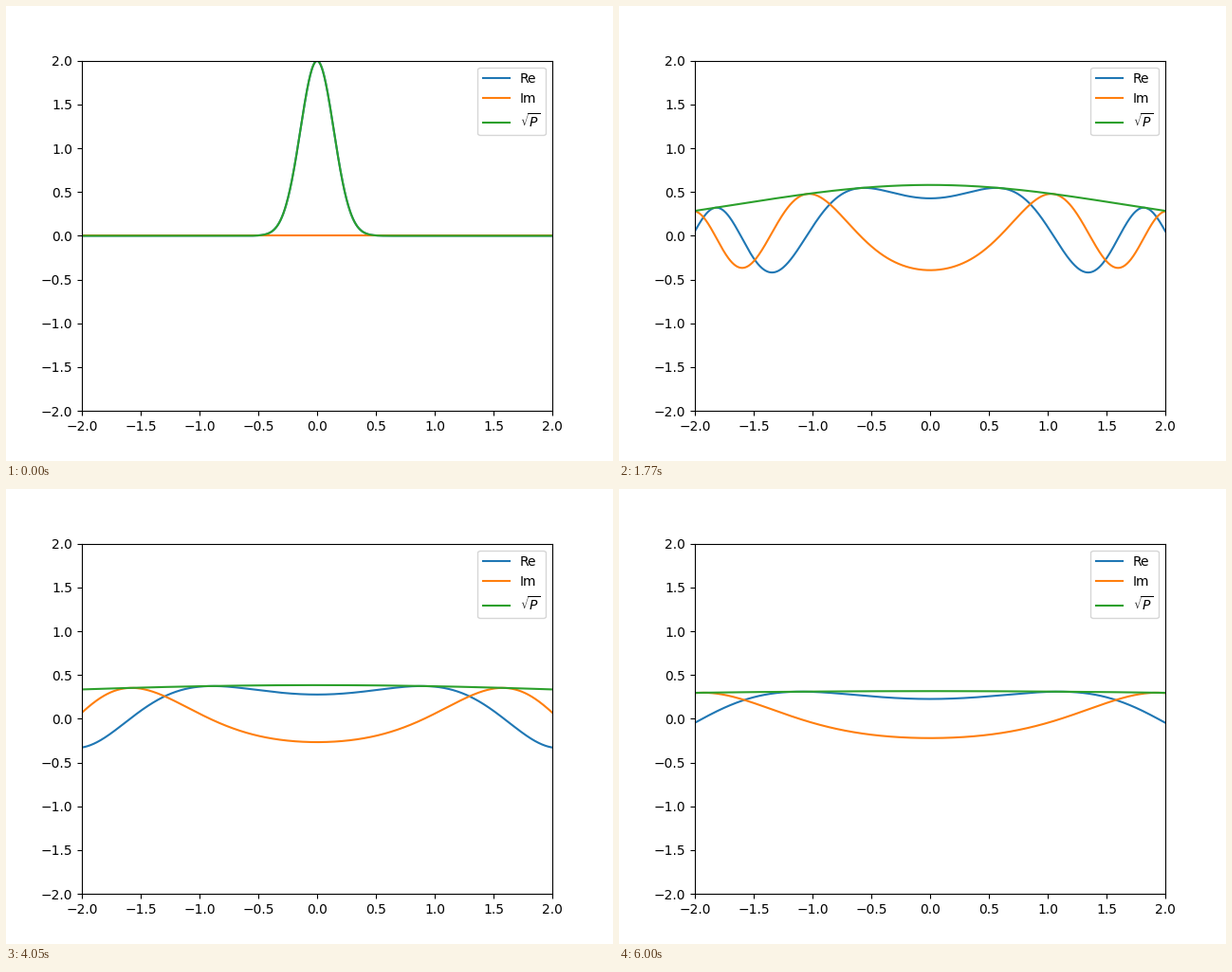
Animation, 640 px wide and 480 px high, one loop 6030 ms. Source, as a matplotlib script:

```python
import numpy as np
import matplotlib.pyplot as plt
from matplotlib.animation import FuncAnimation

FRAMES = 201
INTERVAL = 30      # ms
DT = 0.004         # simulated time per frame
SIGMA = 0.1        # initial packet width

x = np.linspace(-2, 2, 1000)


def psi(t):
    """Free Gaussian wave packet at rest, with hbar = m = 1."""
    spread = 1 + 1j * t / (2 * SIGMA**2)
    norm = (2 * np.pi * SIGMA**2) ** -0.25
    return norm / np.sqrt(spread) * np.exp(-x**2 / (4 * SIGMA**2 * spread))


fig, ax = plt.subplots(figsize=(6.4, 4.8), dpi=100)
ax.set_xlim(-2, 2)
ax.set_ylim(-2, 2)
lines = [ax.plot(x, np.zeros_like(x), label=label)[0]
         for label in ("Re", "Im", r"$\sqrt{P}$")]
ax.legend(loc="upper right")


def update(frame):
    wave = psi(frame * DT)
    for line, y in zip(lines, (wave.real, wave.imag, np.abs(wave))):
        line.set_ydata(y)
    return lines


anim = FuncAnimation(fig, update, frames=FRAMES, interval=INTERVAL,
                     repeat=True, repeat_delay=0)
plt.show()
```
